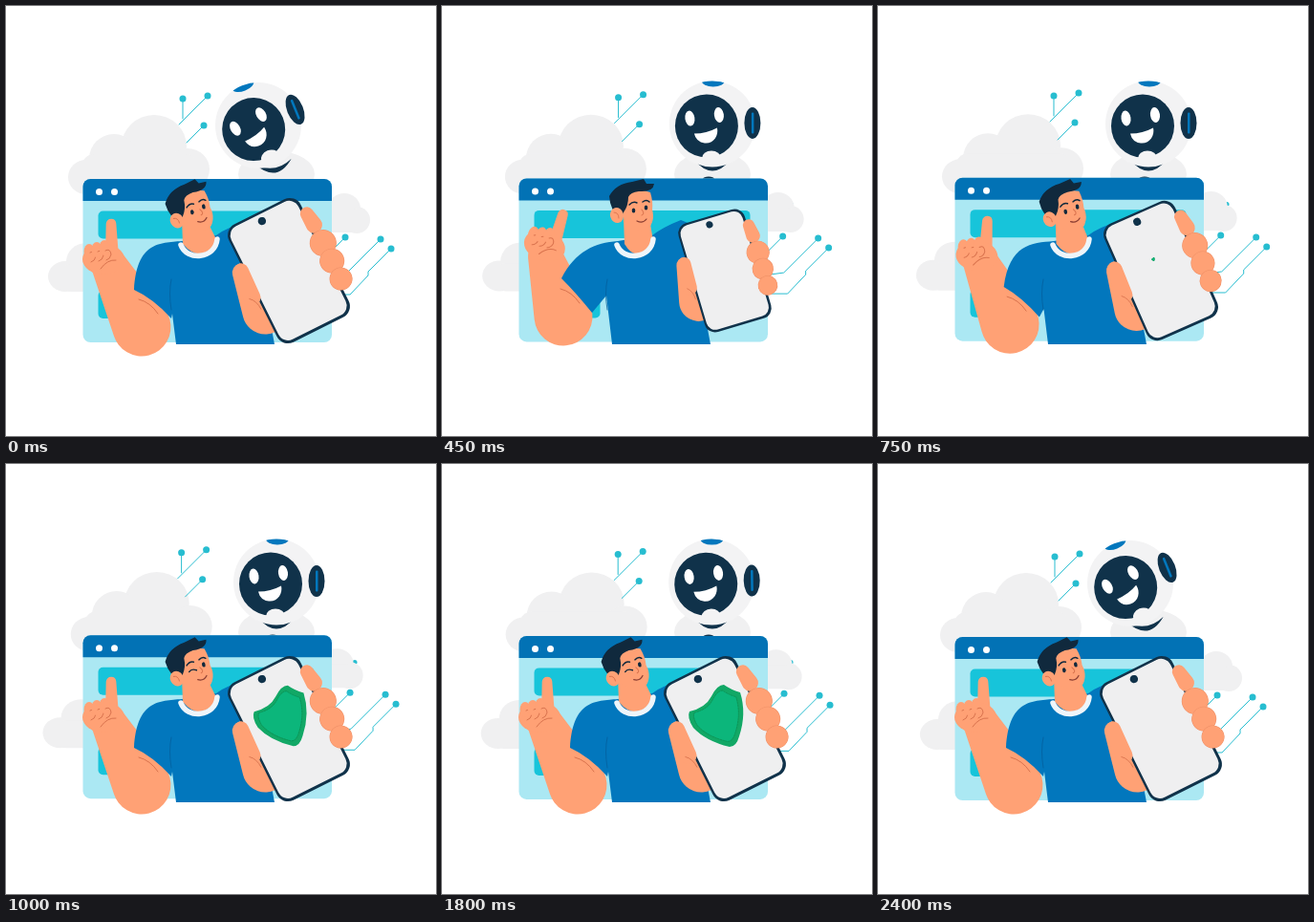
These frames come from a looping animation (450x450 px, 2450 ms). An HTML page with a canvas:

```html
<!DOCTYPE html>
<html lang="en">
<head>
<meta charset="utf-8">
<style>
html, body { margin: 0; width: 100%; height: 100%; overflow: hidden; background: #fff; }
canvas { display: block; width: 450px; height: 450px; }
</style>
</head>
<body>
<canvas id="stage" width="450" height="450"></canvas>
<script>
const ctx = document.getElementById('stage').getContext('2d');
const LOOP = 2450, STEP = 50;
const C = {
  cloud: '#f0f0f1', blue: '#0277bd', header: '#0272b5', seam: '#05609d', pane: '#abe8f3',
  teal: '#17c4da', navy: '#10324a', hair: '#10293d', skin: '#ffa175', crease: '#d9734e',
  line: '#27bdd0', screen: '#efeff0', rim: '#12a866', green: '#0cb67b', stitch: '#0b8b50'
};

const clamp = v => Math.max(0, Math.min(1, v));
const lerp = (a, b, k) => a + (b - a) * k;
const span = (t, a, b) => { const v = clamp((t - a) / (b - a)); return v * v * (3 - 2 * v); };
const pulse = (t, on, onEnd, off, offEnd) => span(t, on, onEnd) * (1 - span(t, off, offEnd));

function fill(color) { ctx.fillStyle = color; ctx.fill(); }

function oval(x, y, rx, ry, color, deg = 0) {
  ctx.beginPath();
  ctx.ellipse(x, y, rx, ry, deg * Math.PI / 180, 0, 7);
  fill(color);
}

function box(x, y, w, h, r, color) {
  ctx.beginPath();
  ctx.roundRect(x, y, w, h, r);
  fill(color);
}

function shape(d, color) {
  ctx.fillStyle = color;
  ctx.fill(new Path2D(d));
}

function curve(d, color, width) {
  ctx.strokeStyle = color;
  ctx.lineWidth = width;
  ctx.lineCap = ctx.lineJoin = 'round';
  ctx.stroke(new Path2D(d));
}

// Tapered hull around two circles.
function limb(x1, y1, r1, x2, y2, r2, color) {
  const dir = Math.atan2(y2 - y1, x2 - x1);
  const open = Math.acos((r1 - r2) / Math.hypot(x2 - x1, y2 - y1));
  ctx.beginPath();
  ctx.arc(x1, y1, r1, dir + open, dir - open + 2 * Math.PI);
  ctx.arc(x2, y2, r2, dir - open, dir + open);
  fill(color);
}

function group(x, y, deg, draw, scale = 1) {
  ctx.save();
  ctx.translate(x, y);
  ctx.rotate(deg * Math.PI / 180);
  ctx.scale(scale, scale);
  draw();
  ctx.restore();
}

function circuit(x, y, route) {
  curve(`M${x} ${y}${route}`, C.line, 1);
  oval(x, y, 3.5, 3.5, C.line);
}

function background(drift) {
  group(3 * drift, -drift, 0, () => {
    oval(155, 147, 34, 33, C.cloud);
    oval(113, 160, 26, 26, C.cloud);
    oval(84, 179, 19, 18, C.cloud);
    oval(190, 171, 23, 22, C.cloud);
    box(80, 155, 120, 42, 12, C.cloud);
  });
  group(-6 * drift, -2 * drift, 0, () => {
    oval(62, 283, 18, 16, C.cloud);
    oval(84, 268, 21, 20, C.cloud);
    box(60, 270, 50, 29, 8, C.cloud);
  });
  oval(365, 207.5, 2.5, 2.5, C.line);
  group(-8 * drift, -3 * drift, 0, () => {
    oval(354, 212, 17, 16, C.cloud);
    oval(367, 224, 14, 14, C.cloud);
    box(335, 212, 35, 25, 6, C.cloud);
  });
  group(1 - 1.5 * drift, -4.5 * drift, 0, () => {
    circuit(184, 97, 'v21');
    circuit(210, 94, 'l-30 30');
    circuit(206, 125, 'l-18 18');
  });
  group(1 + 5.5 * drift, -3 * drift, 0, () => {
    circuit(354, 242, 'l-26 26');
    circuit(391, 244, 'l-36 36 l-15 2');
    circuit(402, 254, 'l-24 24 v4 l-19 20 h-21');
  });
}

function robot(turn, squint) {
  oval(283, 176, 40, 24, C.cloud);
  oval(279, 181, 6 * turn, 2.5 * turn, C.navy);
  group(lerp(280, 283, turn), lerp(163, 161, turn), lerp(-10, 0, turn), () => {
    shape('M-19 0 Q0 23 19 0 Q0 13 -19 0Z', C.navy);
  });
  group(lerp(264, 283, turn), lerp(125, 123.5, turn), lerp(-22, 0, turn), () => {
    oval(0, 0, 45, 45, '#f3f3f4');
    ctx.save();
    ctx.clip();
    oval(1, -45, 12, 6, C.blue);
    ctx.restore();
    oval(42, -1, 8.5, 16.5, C.navy);
    box(41, -12, 2.5, 22, 1, C.blue);
    ctx.translate(-6, 2);
    oval(0, 0, 33, 33, C.navy);
    oval(5, 34, 10, 8, '#f3f3f4');
    const eye = lerp(8, 2.3, squint);
    oval(-17.5, -8, 5, eye, '#fff', -8);
    oval(13, -11.5, 5, eye, '#fff', -8);
    shape('M-13 8 Q0 8 11 2 C13 10 7 19 -2 18 Q-11 17 -13 8Z', '#fff');
  });
}

function browser() {
  box(80.5, 181, 260.5, 171, 8, C.pane);
  box(80.5, 181, 260.5, 23, [8, 8, 0, 0], C.header);
  for (const x of [97.5, 113.5]) oval(x, 194.5, 3.5, 3.5, '#fff');
  box(96.5, 214.5, 226, 29, 5, C.teal);
  box(96.5, 298, 69, 29, 5, C.teal);
}

function arm(pull) {
  const elbow = [lerp(142, 127, pull), lerp(336, 325, pull)];
  limb(lerp(106, 108, pull), lerp(268, 262, pull), 18, ...elbow, 30.5, C.skin);
  curve(`M${elbow[0] - 3} ${elbow[1] - 29} q12 3 20 15`, C.crease, 1);
}

function shirt(pull) {
  const hem = [lerp(134, 125, pull), lerp(297, 285, pull)];
  const cuff = [lerp(173, 157, pull), lerp(327, 321, pull)];
  const shoulder = lerp(247, 256, pull), rise = lerp(227, 224, pull);
  shape(`M184 246 C160 248 ${lerp(137, 140, pull)} ${shoulder} ${hem}
    Q${lerp(154, 140, pull)} ${lerp(306, 300, pull)} ${cuff}
    L${lerp(174, 172, pull)} ${lerp(322, 303, pull)} L178 354 H281
    Q276 325 268 300 L272 233 L250 ${rise} Q232 231 220 240Z`, C.blue);
  curve('M173 286 Q170 300 173 318', C.seam, .8);
}

function pointingHand(pull) {
  group(lerp(102, 108, pull), lerp(263, 249, pull), 18 * pull, () => {
    limb(9, 0, 7, 8, -35, 5.3, C.skin);
    oval(0, 2, 22, 16, C.skin);
    for (let i = 0; i < 3; i++) {
      const x = -15 + 8 * i;
      oval(x, -6 - 2 * i, 5.5, 8, C.skin);
      curve(`M${x + 1} ${-5 - i} q5 -3 6 4 q-1 5 -5 6`, C.crease, 1);
    }
    curve('M-3 12 Q4 2 13 3', C.crease, 1);
  });
}

function head(pull, wink) {
  const x = lerp(198, 204, pull), y = lerp(214, 213, pull);
  shape(`M${x - 14} 222 L${x - 13} 249 Q204 271 221 246 L${x + 14} 228Z`, C.skin);
  curve('M183 250 C189 267 219 265 221 244', '#eef5fa', 5.5);
  group(x, y, lerp(-13, 0, pull), () => {
    shape('M-16 -15 Q0 -23 14 -18 Q17 -8 16 0 Q18 7 16 13 Q12 25 2 22 Q-8 21 -14 13Z', C.skin);
    shape(`M-17 9 Q-28 2 -29 -14 Q-22 -27 -5 -29 L7 -32 L10 -27 L18 -27
      Q17 -18 2 -19 Q-7 -18 -9 -13 Q-9 -4 -14 3Z`, C.hair);
    oval(-21, 6, 7, 8, C.skin, -15);
    curve('M-24 3 Q-19 3 -19 9', C.crease, .9);
    oval(9.5, -2, 1.8, 2.6, C.hair);
    if (wink > .5) curve('M-7 2 Q-4 -1 1 2', C.hair, 1.4);
    else oval(-3.5, 1, 1.8, 2.6, C.hair);
    curve('M-8 -5 Q-4 -9 0 -7', C.hair, 1.5);
    curve('M6 -8 Q10 -11 13 -8', C.hair, 1.5);
    curve('M5 0 Q9 5 5 6', C.crease, 1);
    curve('M0 12 Q6 15 10 10', '#8b3e32', 1.2);
  });
}

function phone(pull) {
  group(296, 277, lerp(-26.5, -16.5, pull), () => {
    limb(-45, -20, 10, -41, 27, 24, C.skin);
    box(-42, -69, 84, 138, 13, C.navy);
    box(-39.5, -66.5, 78.5, 132.5, 11, C.screen);
    oval(-2, -59, 4.2, 4.2, C.navy);
    limb(-45, -22, 8, -47, 8, 9, C.skin);
    curve('M-50 8 q6 5 6 15', C.crease, .8);
    limb(43.5, -45, 7, 45, -31, 8.5, C.skin);
    for (let i = 0; i < 3; i++) {
      const y = -10 + 21 * i, r = 13.5 - i;
      oval(45, y, r + .5, r + .5, '#ee8f66');
      oval(45, y, r, r, C.skin);
    }
  }, lerp(1, .86, pull));
}

function shield(grow) {
  if (!grow) return;
  const crest = `M-29 -6 Q-12 -10 -6 -22 Q0 -34 7 -34 Q14 -29 24 -26 Q31 -4 23 20
    Q20 31 13 31 Q-12 25 -25 11 Q-32 0 -29 -6Z`;
  group(288, 265, 0, () => {
    shape(crest, C.rim);
    ctx.scale(.82, .82);
    shape(crest, C.green);
    ctx.setLineDash([2, 1.5]);
    curve(crest, C.stitch, .9);
  }, grow);
}

function draw(t) {
  const drift = (1 - Math.cos(2 * Math.PI * t / LOOP)) / 2;
  const pull = pulse(t, 0, 250, 450, 900);
  ctx.fillStyle = '#fff';
  ctx.fillRect(0, 0, 450, 450);
  background(drift);
  robot(pulse(t, 0, 470, 1730, 2300), pulse(t, 120, 220, 280, 400));
  group(0, -2 * drift, 0, browser);
  arm(pull);
  shirt(pull);
  pointingHand(pull);
  head(pull, pulse(t, 720, 850, 1900, 2100));
  phone(pull);
  shield(pulse(t, 700, 1030, 1900, 2350));
}

function tick(now) {
  draw(Math.floor(now % LOOP / STEP) * STEP);
  requestAnimationFrame(tick);
}
draw(0);
requestAnimationFrame(tick);
</script>
</body>
</html>
```
